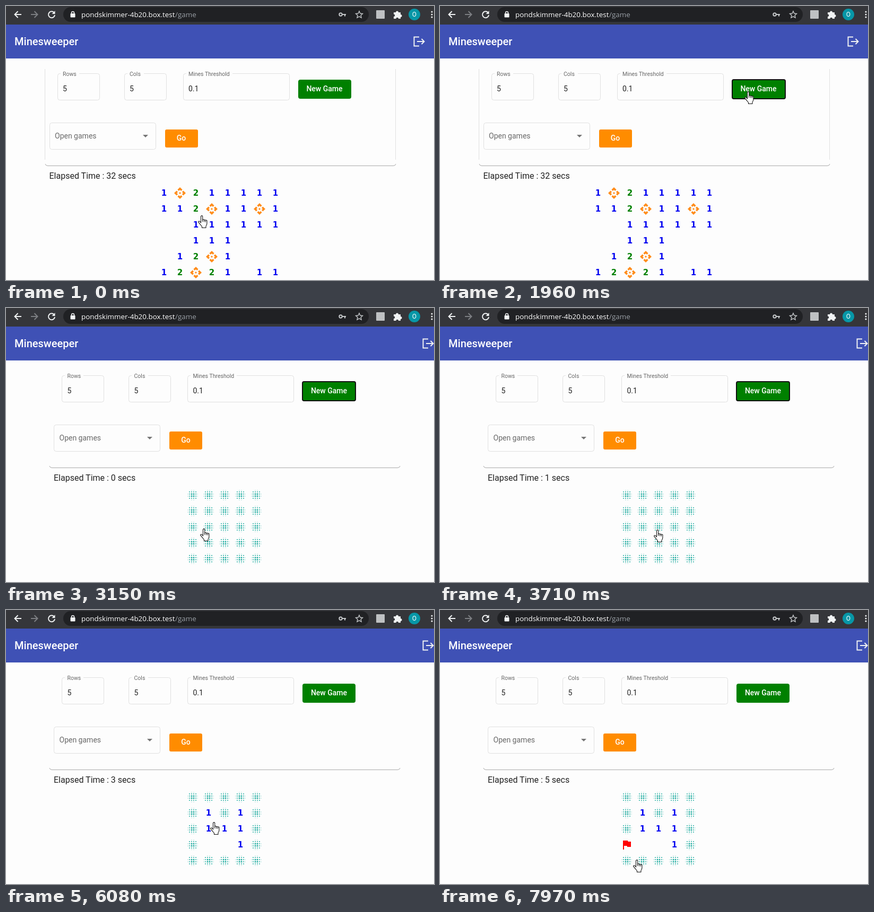
An HTML page for the animation above (8 s loop, 807 px wide and 517 px high).

```html
<!DOCTYPE html>
<html lang="en">
<head>
<meta charset="utf-8">
<title>Mine field game</title>
<style>
  html, body { margin: 0; width: 100%; height: 100%; overflow: hidden; background: #fdfdfd; }
  svg { display: block; width: 807px; height: 517px; font: 14px Roboto, sans-serif; }
  .line { fill: none; stroke: #f1f3f4; stroke-width: 2; }
  .box { fill: none; stroke: #e0e0e0; }
  .label { font-size: 10.5px; fill: #666; }
  .hint { fill: #686868; }
  .value { fill: #212121; }
  .button { font-weight: 500; fill: #fff; text-anchor: middle; }
  .digit { font: bold 15px "DejaVu Sans", sans-serif; text-anchor: middle; }
  .url { font: 13.4px "Open Sans", sans-serif; fill: #fff; }
  .busy .hint { fill: #a8a8a8; }
  .busy .button { fill: rgba(0, 0, 0, .26); }
  .busy #go { fill: #e0e0e0; }
</style>
</head>
<body>
<svg viewBox="0 0 807 517" id="stage">
  <defs>
    <path id="mine" fill="#ff8c1a" d="M14 12l-2 2-2-2 2-2zM12 6l2.1 2.1 2.5-2.5L12 1 7.4 5.6l2.5 2.5zM6 12l2.1-2.1-2.5-2.5L1 12l4.6 4.6 2.5-2.5zM18 12l-2.1 2.1 2.5 2.5L23 12l-4.6-4.6-2.5 2.5zM12 18l-2.1-2.1-2.5 2.5L12 23l4.6-4.6-2.5-2.5z"/>
    <path id="flag" fill="#f00" d="M14.4 6L14 4H5v17h2v-7h5.6l.4 2h7V6z"/>
    <g id="cover" fill="#20aca1"></g>
  </defs>

  <rect width="807" height="35" fill="#35363a"/>
  <rect x="108" y="2" width="576" height="28" rx="14" fill="#202124"/>
  <g class="line">
    <path d="M29 16H16.5M22.500 10l-6 6 6 6"/>
    <path d="M47 16h12.500M53.500 10l6 6-6 6" stroke="#7d7f83"/>
    <path d="M90.500 12.200A6 6 0 1 0 92 17"/>
    <path d="M123.500 15v-2a2.500 2.500 0 0 1 5 0v2" stroke-width="1.500"/>
    <circle cx="631" cy="16" r="2.700" stroke="#c4c7c9"/>
    <path d="M634 16h7M639 16v3.500" stroke="#c4c7c9"/>
    <path d="M666 9.800l1.900 4.200 4.600.5-3.400 3.100.9 4.500-4-2.300-4 2.300.9-4.500-3.400-3.100 4.600-.5z" stroke="#c4c7c9" stroke-width="1.400"/>
  </g>
  <path d="M92.500 9v6h-6z" fill="#f1f3f4"/>
  <rect x="121.500" y="14" width="9" height="7.500" rx="1" fill="#f1f3f4"/>
  <rect x="698" y="8" width="16" height="16" rx="1" fill="#bfc1c3"/>
  <path d="M731 12h4a2.500 2.500 0 0 1 5 0h4v4a2.500 2.500 0 0 1 0 5v3h-4a2.300 2.300 0 0 0-4.600 0H731v-4a2.300 2.300 0 0 0 0-4.600z" fill="#f1f3f4"/>
  <circle cx="770" cy="16" r="11" fill="#0797a7"/>
  <text x="770" y="20" text-anchor="middle" font-size="12" fill="#fff">O</text>
  <g fill="#f1f3f4"><circle cx="803" cy="11" r="1.600"/><circle cx="803" cy="16" r="1.600"/><circle cx="803" cy="21" r="1.600"/></g>
  <text class="url" x="142" y="21">pondskimmer-4b20.box.test</text>
  <text class="url" x="319" y="21" style="fill:#9aa0a6">/game</text>

  <rect y="35" width="807" height="64" fill="#3f51b5"/>
  <text x="16" y="74" font-size="20" font-weight="500" fill="#fff">Minesweeper</text>
  <path id="logout" class="line" d="M779 58.500h-9.500v17h9.500M775 67h13M783.500 62l5 5-5 5" stroke="#fff"/>

  <g id="form">
    <g id="shapes">
      <path id="sides" class="box" d="M73.500 119v171M734.500 119v171"/>
      <path d="M74 298q.5 3.500 5 3.500h651q4.500 0 5-3.500" fill="none" stroke="#a9a9a9"/>
      <rect class="box" x="82.500" y="220.500" width="200" height="50" rx="4"/>
      <path d="M258 243h10l-5 5z" fill="#757575"/>
      <rect x="551" y="139" width="100" height="36" rx="4" fill="#008000"/>
      <rect id="ring" x="551" y="139" width="100" height="36" rx="3" fill="none" stroke="#101010" stroke-width="2"/>
      <rect id="go" x="300" y="233" width="62" height="34" rx="3" fill="#ff8c00"/>
    </g>
    <g id="words">
      <text class="hint" x="92" y="250">Open games</text>
      <text class="button" x="600.500" y="161">New Game</text>
      <text class="button" x="330.500" y="254">Go</text>
      <text id="clock" class="value" x="81.500" y="326" font-size="16"></text>
    </g>
  </g>
  <g id="boards"></g>

  <g id="hand" fill="#fff" stroke="#111" stroke-width="1.100" stroke-linejoin="round">
    <path d="M5.500 14V2.200a1.600 1.600 0 0 1 3.200 0V9a1.500 1.500 0 0 1 3 .4 1.400 1.400 0 0 1 2.700.6 1.300 1.300 0 0 1 2.500.8V15q0 3-2 5.500v3H7.500v-2.500Q4 17 1 13.200q-.8-1.400.3-2 1.400-.6 2.600.9z"/>
    <path d="M8.700 9v3M11.700 9.500v3M14.400 10.200v2.600"/>
  </g>
  <path id="arrow" d="M.5.500v16L4.300 13l2.500 5.500 2.200-1-2.400-5.300h4.900z" fill="#fff" stroke="#111"/>
</svg>
<script>
const LOOP = 8000;
const NEW_GAME = 2370;
const $ = id => document.getElementById(id);

function add(parent, tag, attrs, text = '') {
  const node = document.createElementNS($('stage').namespaceURI, tag);
  for (const key in attrs) node.setAttribute(key, attrs[key]);
  node.textContent = text;
  parent.append(node);
  return node;
}

// Covered cell: dots that shrink away from the centre, without the corners.
const steps = [3, 6, 10, 14, 18, 21];
const reach = v => Math.abs(v - 12);
for (const x of steps) for (const y of steps) {
  const far = Math.max(reach(x), reach(y));
  if (far === 9 && Math.min(reach(x), reach(y)) > 2) continue;
  add($('cover'), 'circle', { cx: x, cy: y, r: far === 2 ? 1.5 : far === 6 ? 1 : 0.5 });
}

function field(x, width, label, gap, value) {
  add($('shapes'), 'rect', { class: 'box', x: x + 0.5, y: 127.5, width: width - 1, height: 50, rx: 4 });
  add($('shapes'), 'rect', { x: x + 6, y: 126, width: gap, height: 4, fill: '#fdfdfd' });
  add($('words'), 'text', { class: 'label', x: x + 10, y: 132 }, label);
  add($('words'), 'text', { class: 'value', x: x + 10, y: 161 }, value);
}
field(97, 80, 'Rows', 35, '5');
field(223, 80, 'Cols', 31, '5');
field(334, 201, 'Mines Threshold', 87, '0.1');

const icons = { '*': 'mine', '#': 'cover', F: 'flag' };
const inks = { 1: '#0000f0', 2: '#008000' };
function board(left, rows) {
  const group = add($('boards'), 'g', {});
  rows.split(' ').forEach((row, r) => [...row].forEach((cell, c) => {
    const x = left + 30 * c, y = 353 + 30 * r;
    if (icons[cell]) add(group, 'use', { href: '#' + icons[cell], x: x - 12, y: y - 12 });
    else if (inks[cell]) add(group, 'text', { class: 'digit', x, y: y + 5, fill: inks[cell] }, cell);
  }));
  return group;
}

const boards = [
  [0, board(298, '1*211111 112*11*1 ..111111 ..111... .12*1... 12*21.11')],
  [NEW_GAME, board(352, '##### ##### ##### ##### #####')],
  [4520, board(352, '##### #1#1# #111# #..1# #####')],
  [7690, board(352, '##### #1#1# #111# F..1# #####')]
];

const seconds = [[0, 32], [NEW_GAME, 0], [3290, 1], [4240, 2], [5300, 3], [6240, 4], [7190, 5]];

// time, left, top, pointer
const pointer = [
  [0, 362, 395, 'hand'], [620, 441, 279, 'arrow'], [760, 524, 190, 'arrow'],
  [910, 549, 177, 'arrow'], [1030, 566, 171, 'hand'], [1150, 573, 165, 'hand'],
  [1280, 574, 161, 'hand'], [NEW_GAME, 576, 160, 'hand'], [2870, 530, 196, 'hand'],
  [3020, 430, 340, 'arrow'], [3150, 366, 416, 'hand'], [3290, 378, 423, 'hand'],
  [3420, 386, 419, 'hand'], [3570, 395, 419, 'hand'], [3710, 403, 418, 'hand'],
  [5140, 403, 416, 'hand'], [5300, 404, 406, 'hand'], [5420, 404, 390, 'hand'],
  [5540, 404, 380, 'hand'], [5680, 404, 379, 'hand'], [6080, 385, 400, 'hand'],
  [6240, 375, 413, 'hand'], [6380, 364, 437, 'hand'], [6500, 354, 430, 'hand'],
  [6630, 350, 425, 'hand'], [7070, 0, 0, 'none'], [7690, 351, 446, 'hand'],
  [7810, 352, 454, 'hand'], [7970, 364, 471, 'hand']
];

const at = (table, t) => table.findLast(entry => entry[0] <= t);
const show = (node, on) => { node.style.display = on ? '' : 'none'; };
const shift = (id, x, y = 0) => $(id).setAttribute('transform', `translate(${x} ${y})`);

function draw(t) {
  const wide = t >= NEW_GAME;
  shift('shapes', wide ? 8 : 0);
  shift('words', wide ? 8.5 : 0);
  shift('logout', wide ? 17 : 0);
  show($('sides'), !wide);
  show($('ring'), t >= 1420 && t < 3840);
  $('form').classList.toggle('busy', t >= 1540 && t < 1960);
  $('clock').textContent = `Elapsed Time : ${at(seconds, t)[1]} secs`;

  const current = at(boards, t);
  for (const entry of boards) show(entry[1], entry === current);

  const [, x, y, kind] = at(pointer, t);
  for (const id of ['hand', 'arrow']) {
    show($(id), id === kind);
    shift(id, x, y);
  }
}

const start = performance.now();
function tick() {
  draw((performance.now() - start) % LOOP);
  requestAnimationFrame(tick);
}
tick();
</script>
</body>
</html>
```
